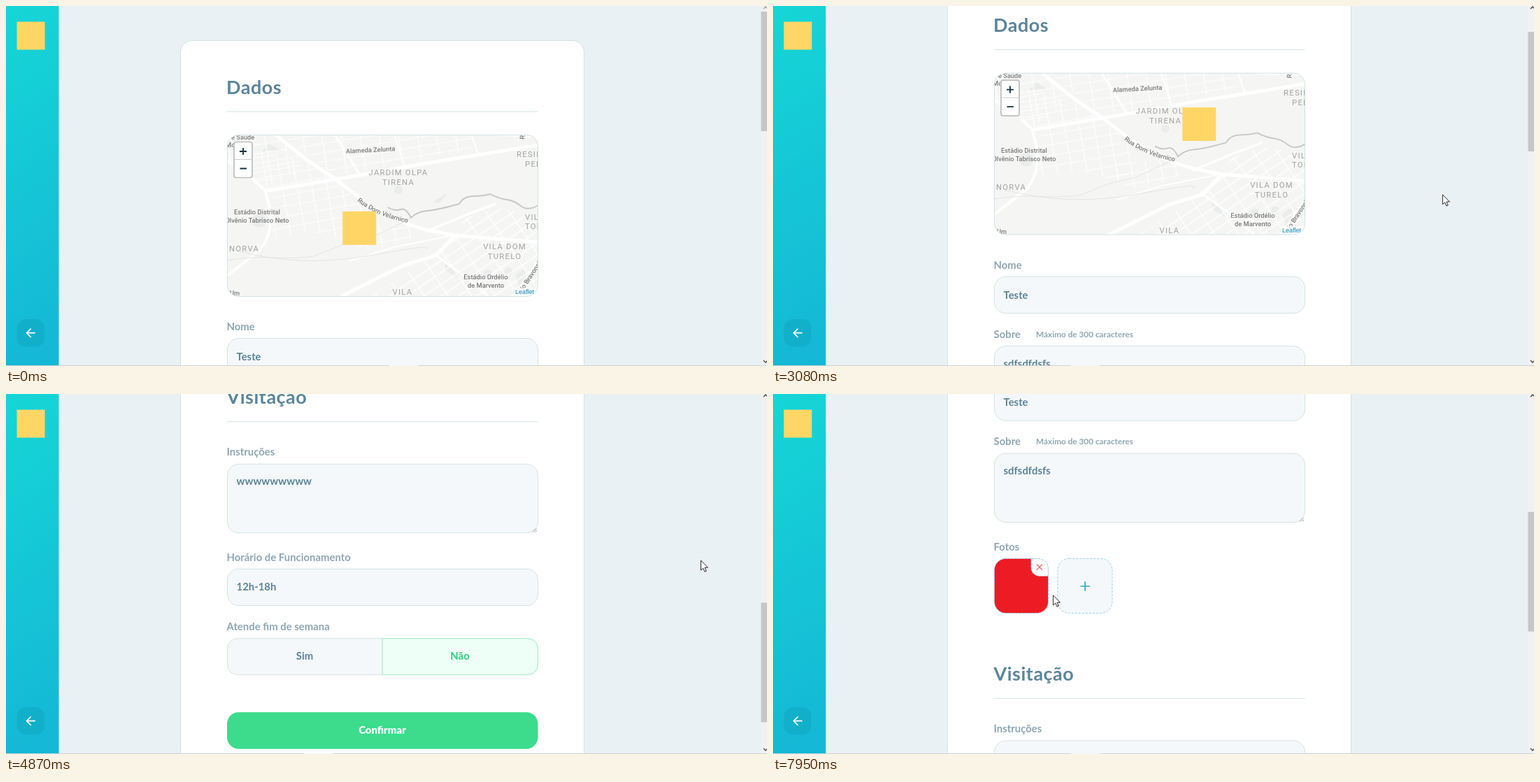
Animation of 1088x515 px, one loop 8000 ms. Source, as an HTML page:

```html
<!DOCTYPE html>
<html lang="pt-BR">
<head>
<meta charset="utf-8">
<title>Dados</title>
<style>
  html, body { margin: 0; width: 100%; height: 100%; overflow: hidden; background: #ebf2f5; }
  svg { display: block; width: 1088px; height: 515px; font: 700 14.9px Lato, "Open Sans", sans-serif; }
  .title { font-size: 27px; letter-spacing: .5px; fill: #5c8599; }
  .label { fill: #8fa7b3; }
  .hint { font-size: 11.8px; fill: #8fa7b3; }
  .value { fill: #5c8599; }
  .rule { stroke: #d3e2e5; }
  .field { fill: #f5f8fa; stroke: #d3e2e5; }
  .dash { stroke: #96d2f0; stroke-dasharray: 3 2; }
  .line { fill: none; }
  .mid { text-anchor: middle; }
  .road { fill: none; stroke: #fff; stroke-linejoin: round; }
  .place { font: 500 9.3px Roboto, "Noto Sans", sans-serif; fill: #7c7c7c; }
  .area { font: 400 11.3px Roboto, "Noto Sans", sans-serif; fill: #a3a3a3; letter-spacing: 1.25px; }
</style>
</head>
<body>
<svg viewBox="0 0 1088 515">
  <defs>
    <linearGradient id="side" gradientUnits="userSpaceOnUse" x1="160" y1="465" x2="-85" y2="50">
      <stop stop-color="#15b6d6"/><stop offset="1" stop-color="#15d6d6"/>
    </linearGradient>
    <clipPath id="mapClip"><rect x="316.5" y="184.5" width="444" height="231" rx="16"/></clipPath>
    <clipPath id="pairClip"><rect x="316" y="1235" width="445" height="53" rx="16.5"/></clipPath>
    <pattern id="west" width="21" height="15" patternUnits="userSpaceOnUse" patternTransform="rotate(-10)">
      <path class="road" d="M0 6H21M8 0V15" stroke-width="1.2"/>
    </pattern>
    <pattern id="north" width="27" height="13" patternUnits="userSpaceOnUse" patternTransform="rotate(-9)">
      <path class="road" d="M0 5H27M12 0V13" stroke-width="1.2"/>
    </pattern>
    <pattern id="south" width="28" height="14" patternUnits="userSpaceOnUse" patternTransform="rotate(-34)">
      <path class="road" d="M0 6H28M12 0V14" stroke-width="1.4"/>
    </pattern>
  </defs>

  <rect width="1088" height="515" fill="#e9f1f4"/>
  <g id="page">
    <rect x="249.5" y="49.5" width="577" height="1397" rx="16.5" fill="#fff" stroke="#d3e2e5"/>
    <g clip-path="url(#mapClip)">
      <rect x="316" y="184" width="445" height="232" fill="#f5f5f4"/>
      <g id="map">
        <g fill="#ebecec">
          <circle cx="362" cy="307" r="10"/><circle cx="561" cy="263" r="6"/>
          <circle cx="689" cy="384" r="7"/><circle cx="718" cy="380" r="6"/>
          <path d="M365 208L376 197L392 206ZM627 368L652 381L646 389L628 378ZM728 385L740 376L748 392L734 402ZM610 280L622 273L630 268L620 282Z"/>
        </g>
        <path fill="url(#west)" d="M317 222L365 206L440 228L500 275L520 308L500 340L435 322L380 335V265Z"/>
        <path fill="url(#north)" d="M317 184H385L430 222L370 262L317 225ZM395 184H665V206L500 238L470 244Z"/>
        <path fill="url(#south)" d="M640 330L760 340V416H520L590 372ZM655 305L700 288L760 300V335L640 326Z"/>
        <path fill="url(#west)" d="M485 325L545 306L598 322L550 344L505 350Z"/>
        <g class="road">
          <path stroke-width="5" d="M370 265L500 243L600 225L761 199"/>
          <path stroke-width="5" d="M385 184L430 220L470 247L500 270Q545 305 600 320L640 328L761 338"/>
          <path stroke-width="4" d="M316 386L362 350Q384 325 376 285L370 263L340 237L316 222"/>
          <path stroke-width="5" d="M642 328L615 357L568 371L478 416"/>
          <path stroke-width="3" d="M615 357L660 390L690 416M470 184L505 240M760 365L725 416M600 323L655 300L700 283"/>
          <path stroke-width="2" d="M665 184L675 213M555 184L570 230M690 184L761 187M490 365L555 345L640 328"/>
        </g>
        <path class="line" stroke="#e4e4e3" d="M316 364Q350 358 382 360T440 358L480 342L520 332L550 318L580 303M330 350Q420 375 520 357T600 348"/>
        <path class="line" stroke="#c6c7c6" stroke-width="1.9" stroke-linejoin="round" d="M546 288Q556 294 564 291T579 303Q588 294 602 293T648 283Q654 272 668 272T692 269Q706 276 716 277T736 286T761 285"/>
        <path id="street" class="line" d="M502 279Q535 305 590 313"/>
        <g class="place">
          <text x="322" y="191">e Saúde</text><text x="314" y="202">Monralva</text>
          <text x="486" y="211" transform="rotate(-3 486 211)">Alameda Zelunta</text>
          <text><textPath href="#street">Rua Dom Velarnico</textPath></text>
          <g class="mid">
            <text x="359" y="298">Estádio Distrital</text><text x="359" y="310">Olvênio Tabrisco Neto</text>
            <text x="686" y="391">Estádio Ordélio</text><text x="686" y="403">de Marvento</text>
          </g>
          <text transform="translate(740 407) rotate(-57)">lo Bravonel</text>
          <text transform="translate(741 191) rotate(-85)">R.</text>
          <text x="320" y="414">Um</text>
        </g>
        <g class="area">
          <g class="mid">
            <text x="561" y="242">JARDIM OLPA</text><text x="561" y="256">TIRENA</text>
            <text x="713" y="348">VILA DOM</text><text x="713" y="362">TURELO</text>
            <text x="567" y="413">VILA</text>
          </g>
          <text x="319" y="351">NORVA</text>
          <text x="730" y="216">RESIDENCIAL</text><text x="742" y="230">PELTURA</text>
          <text x="742" y="306">VILA</text><text x="742" y="319">TOLVE</text>
        </g>
      </g>
      <rect id="marker" width="48" height="48" fill="#ffd666"/>
      <rect x="727" y="403" width="34" height="13" fill="#fff" opacity=".75"/>
      <text x="728" y="412" style="font:400 9px 'Liberation Sans',sans-serif" fill="#0a86ad">Leaflet</text>
    </g>
    <rect class="line" x="316.5" y="184.5" width="444" height="231" rx="16" stroke="#d3e2e5"/>
    <rect x="326" y="194.5" width="26" height="51" rx="3" fill="#fff" stroke="#bebebe" stroke-width="1.7"/>
    <path stroke="#ccc" d="M327 219.5H351"/>
    <path stroke="#12313f" stroke-width="1.8" d="M334 208H344M339 203V213M334.5 232.5H344"/>
    <g id="form"></g>
    <rect x="316.5" y="725.5" width="77" height="78" rx="16.5" fill="#ed1c24" class="dash"/>
    <path class="dash" fill="#fff" d="M369 725.5H377Q393.5 725.5 393.5 742V750.5H381Q369 749 369 738Z"/>
    <path stroke="#e8656c" stroke-width="1.2" d="M377 733.5L385 741.5M385 733.5L377 741.5"/>
    <rect x="407" y="725.5" width="78" height="78" rx="16.5" fill="#f5f8fa" class="dash"/>
    <path stroke="#2fa7cc" stroke-width="1.7" d="M439.5 765H453M446.2 758.2V771.7"/>
    <g id="pair"></g>
    <rect x="316" y="1341" width="444.5" height="52.5" rx="16.5" fill="#3cdc8c"/>
    <text class="mid" x="538" y="1372" fill="#fff" font-weight="900">Confirmar</text>
  </g>

  <rect width="75.5" height="515" fill="url(#side)"/>
  <rect x="15.5" y="22.5" width="40" height="40" fill="#ffd666"/>
  <rect x="15.5" y="448" width="39.5" height="39.5" rx="13" fill="#12afcb"/>
  <path class="line" stroke="#fff" stroke-width="1.7" stroke-linecap="round" stroke-linejoin="round" d="M41.2 467.7H29.5M35.3 462L29.5 467.7L35.3 473.5"/>

  <rect x="1079.5" width="8.5" height="515" fill="#f1f1f1"/>
  <rect id="thumb" x="1079.5" width="8.5" height="171" fill="#c6c6c6"/>
  <path id="upArrow" class="line" stroke-width="1.5" d="M1083 4L1086 1L1089 4"/>
  <path id="downArrow" class="line" stroke-width="1.5" d="M1083 507L1086 510L1089 507"/>
  <rect y="514" width="1088" height="1" fill="#cfd2d3"/>
  <rect id="notch" y="514" width="41" height="1" fill="#f6f6f6"/>

  <g id="cursor" stroke="#111" stroke-width=".9" stroke-linejoin="round" fill="#fff">
    <circle id="halo" r="10" fill="#f8f340" stroke="none"/>
    <path id="arrow" d="M0 0V14L3.2 11L5.4 16.2L7.7 15.2L5.5 10.2H10Z"/>
    <path id="point" d="M0 0Q1.6 0 1.6 1.8V7L7.5 8.5Q9 9 8.8 11L7.5 17V19.5H-.5V17.5L-4.5 12Q-4.8 9.7-2.7 10.7L-1.5 12V1.8Q-1.5 0 0 0Z"/>
    <g id="grab">
      <path fill="#f8f340" d="M-3 7L-7 1Q-7.5-2-4.5 0L-5.5-4Q-5-6.5-3.3-4.5L-2-6.5Q0-8.5 1-6L3-6Q4.5-6 4.5-3.5Q7.5-4.5 7 0L5.5 7Z"/>
      <path class="line" d="M-4.5 0L-3 2M-3.3-4.5L-1.8 0M1-6V0M4.5-3.5L4 0"/>
    </g>
  </g>
</svg>
<script>
const LOOP = 8000, TICK = 77.18;
const PIN_CLICK = 1000, YES_CLICK = 6330, NO_CLICK = 6640, FADE = 350;
const $ = id => document.getElementById(id);
const set = (id, name, value) => $(id).setAttribute(name, value);
const show = (id, on) => set(id, 'visibility', on ? 'visible' : 'hidden');

const text = (cls, x, y, s) => `<text class="${cls}" x="${x}" y="${y}">${s}</text>`;
const rule = y => `<path class="rule" d="M316 ${y}H760.5"/>`;
const field = (y, h, value, baseline) =>
  `<rect class="field" x="316.5" y="${y}" width="444" height="${h}" rx="16.5"/>` + text('value', 329.5, baseline, value);
const area = (y, value, baseline) => field(y, 98.5, value, baseline) +
  `<path stroke="#777" stroke-width=".8" d="M753 ${y + 97.5}l5.5-5.5M756.5 ${y + 97.5}l2.5-2.5"/>`;

$('form').innerHTML =
  text('title', 315, 125.5, 'Dados') + rule(151) +
  text('label', 315.5, 464, 'Nome') + field(475.5, 52.5, 'Teste', 507) +
  text('label', 315.5, 563, 'Sobre') + text('hint', 376, 562, 'Máximo de 300 caracteres') +
  area(575, 'sdfsdfdsfs', 605) +
  text('label', 315.5, 713.5, 'Fotos') +
  text('title', 315.5, 900, 'Visitação') + rule(925.5) +
  text('label', 315.5, 974, 'Instruções') + area(986, 'wwwwwwwww', 1016) +
  text('label', 315.5, 1124.5, 'Horário de Funcionamento') + field(1136, 52.5, '12h-18h', 1167) +
  text('label', 315.5, 1223.5, 'Atende fim de semana');

// Scroll gestures: first tick, ticks, start offset, end offset, acceleration
const scrolls = [
  [38, 6, 0, 330, 1.9], [47, 5, 330, 578, 1.91], [53, 5, 578, 743, 1.91],
  [59, 7, 743, 986, 1.58], [95, 9, 986, 490, 1.5]
];
// Pointer path: time, x, y
const path = [
  [70, 942, 472], [300, 840, 412], [550, 700, 335], [850, 592, 299], [930, 609, 288],
  [1080, 609, 288], [1400, 590, 335], [1760, 520, 340], [1920, 490, 310], [2084, 500, 275],
  [2220, 590, 232], [2390, 760, 270], [2550, 932, 288], [2930, 932, 288], [3320, 995, 243],
  [3620, 995, 243], [4250, 994.5, 242], [4870, 993.5, 238], [5640, 993.5, 238],
  [5900, 740, 325], [6150, 440, 275], [6330, 440, 275], [6483, 677, 265], [6700, 677, 268],
  [6950, 830, 310], [7270, 1012, 322], [7400, 990, 318], [7800, 430, 290], [7950, 400.5, 288]
];

const clamp = v => Math.min(1, Math.max(0, v));
const mix = (a, b, p) => a + (b - a) * p;

function scrollAt(tick) {
  let offset = 0;
  for (const [first, count, from, to, power] of scrolls)
    if (tick >= first) offset = mix(from, to, clamp((tick - first + 1) / count) ** power);
  return offset;
}

function pointerAt(t) {
  const i = path.findIndex(k => k[0] > t);
  if (i < 0) return path[path.length - 1].slice(1);
  if (i === 0) return path[0].slice(1);
  const [t0, x0, y0] = path[i - 1], [t1, x1, y1] = path[i];
  const p = (t - t0) / (t1 - t0);
  return [mix(x0, x1, p), mix(y0, y1, p)];
}

function option(x, label, green, active, focus) {
  const color = [0, 1, 2].map(i => Math.round(mix([92, 133, 153][i], [55, 199, 127][i], green)));
  const box = `x="${x}" y="1235.5" width="222" height="52"`;
  const d = x < 400
    ? `M538.5 1235.5H333Q316.5 1235.5 316.5 1252V1271Q316.5 1287.5 333 1287.5H538.5Z`
    : `M538 1235.5H744Q760.5 1235.5 760.5 1252V1271Q760.5 1287.5 744 1287.5H538Z`;
  return `<rect ${box} fill="${active ? '#edfff6' : '#f5f8fa'}" ${focus ? 'rx="2"' : 'clip-path="url(#pairClip)"'}/>` +
    `<path class="line" stroke="${active ? '#a1e9c5' : '#d3e2e5'}" d="${d}"/>` +
    `<text class="mid" x="${x + 110.5}" y="1266" fill="rgb(${color})">${label}</text>` +
    (focus ? `<rect class="line" ${box} rx="2" stroke="#111" stroke-width="1.8"/>` : '');
}

function drawOptions(t) {
  const yes = t >= YES_CLICK && t < NO_CLICK, clicked = t >= YES_CLICK;
  const green = t < NO_CLICK ? clamp((t - YES_CLICK) / FADE) : 1 - clamp((t - NO_CLICK) / FADE);
  const sim = option(316.5, 'Sim', green, yes, yes);
  const nao = option(538.5, 'Não', 1 - green, !yes, clicked && !yes);
  $('pair').innerHTML = yes ? nao + sim : sim + nao;
}

function draw(now) {
  const tick = Math.floor((now % LOOP + 16) / TICK), t = tick * TICK;
  const scroll = scrollAt(tick), [x, y] = pointerAt(t), pageY = y + scroll;
  const placed = t >= PIN_CLICK;

  set('page', 'transform', `translate(0 ${-scroll})`);
  set('map', 'transform', `translate(0 ${placed ? .8 : 0})`);
  set('marker', 'x', placed ? 585.3 : 481.2);
  set('marker', 'y', placed ? 233.5 : 293.8);
  set('thumb', 'y', 8 + scroll * .328);
  set('notch', 'x', placed ? 426 : 548);
  set('upArrow', 'stroke', scroll ? '#505050' : '#a3a3a3');
  set('downArrow', 'stroke', scroll < 986 ? '#505050' : '#a3a3a3');
  drawOptions(t);

  const inForm = x > 316 && x < 760;
  const onMap = inForm && pageY > 185 && pageY < 415;
  const onButton = inForm && (pageY > 1235 && pageY < 1288 || pageY > 1341 && pageY < 1393);
  const visible = tick > 0;
  set('cursor', 'transform', `translate(${x} ${y})`);
  show('halo', visible && t < 2690);
  show('grab', visible && onMap);
  show('point', visible && onButton);
  show('arrow', visible && !onMap && !onButton);
}

let start;
function frame(now) {
  start ??= now;
  draw(now - start);
  requestAnimationFrame(frame);
}
draw(0);
requestAnimationFrame(frame);
</script>
</body>
</html>
```
